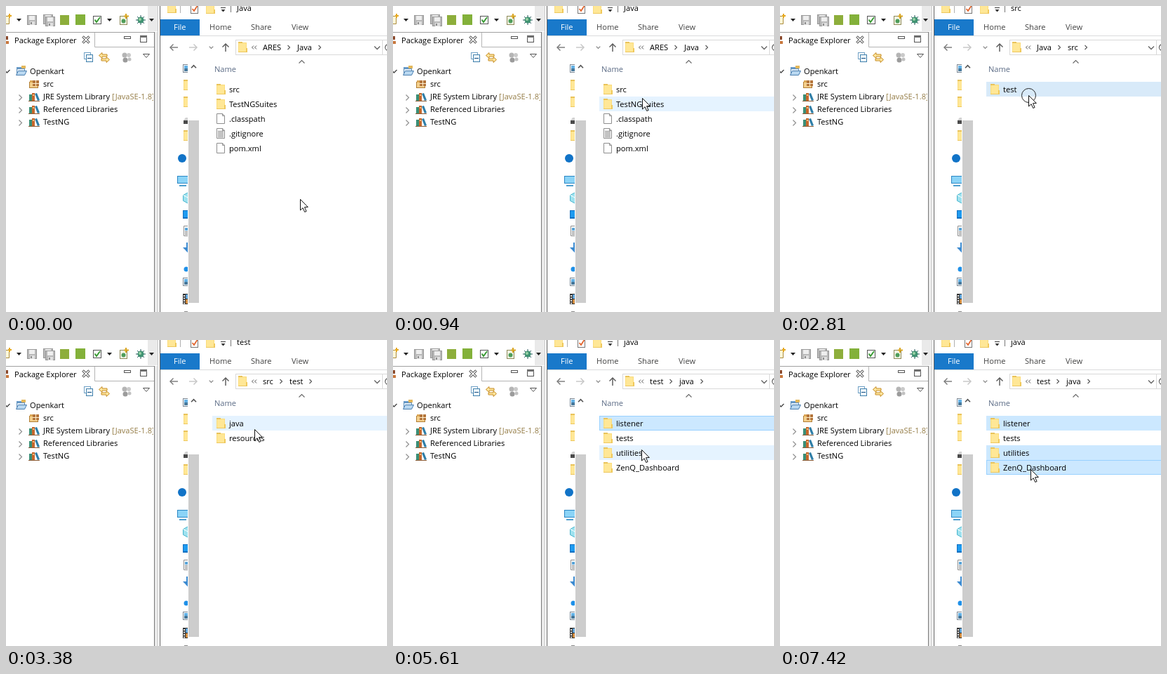
An HTML page with a canvas that plays this animation: 543 by 436 pixels, repeating every 8 s.

```html
<!DOCTYPE html>
<html lang="en">
<head>
<meta charset="utf-8">
<title>Copying folders into a project</title>
<style>
html, body { margin: 0; width: 543px; height: 436px; overflow: hidden; background: #fff; }
canvas { display: block; width: 543px; height: 436px; }
</style>
</head>
<body>
<canvas id="stage"></canvas>
<script>
(() => {
const W = 543, H = 436, LOOP = 8000;
const stage = document.getElementById('stage');
const dpr = window.devicePixelRatio || 1;
stage.width = W * dpr;
stage.height = H * dpr;
const c = stage.getContext('2d');
const FONT = '11.1px "Open Sans", "Noto Sans", sans-serif';

const HOVER = '#e5f3ff', PICK = '#cce8ff', FOCUS = '#99d1ff', SOFT = '#d8eaf9';
const ROOT = ['src/', 'TestNGSuites/', '.classpath', '.gitignore', 'pom.xml'];
const JAVA = ['listener/', 'tests/', 'utilities/', 'ZenQ_Dashboard/'];

// Each step changes part of the state: cursor, hovered row, click ring, folder...
const steps = [
  [0, { title: 'Java', path: ['ARES', 'Java'], files: ROOT, at: [419, 275], hover: -1, soft: false, picked: [], focus: -1, ring: false }],
  [400, { at: [406, 233] }],
  [520, { at: [388, 194], hover: 4 }],
  [680, { at: [376, 178], hover: 3 }],
  [820, { at: [364, 156], hover: 2 }],
  [940, { at: [355, 131], hover: 1 }],
  [1090, { at: [354, 128], hover: 0 }],
  [1210, { at: [354, 127] }],
  [1740, { ring: true, picked: [0], focus: 0 }],
  [1860, { ring: false }],
  [2010, { title: 'src', path: ['Java', 'src'], files: [], picked: [], focus: -1, hover: -1 }],
  [2130, { files: ['test/'], hover: 0 }],
  [2250, { soft: true }],
  [2810, { ring: true }],
  [2960, { ring: false }],
  [3080, { title: 'test', path: ['Java', 'src', 'test'], files: [], soft: false, hover: -1 }],
  [3230, { files: ['java/', 'resources/'], hover: 0 }],
  [3380, { path: ['src', 'test'] }],
  [3880, { ring: true, picked: [0], focus: 0 }],
  [4000, { ring: false }],
  [4150, { title: 'java', path: ['test', 'java'], files: [], picked: [], focus: -1, hover: -1 }],
  [4270, { files: JAVA }],
  [4390, { hover: 0 }],
  [4940, { ring: true, picked: [0], focus: 0 }],
  [5060, { ring: false }],
  [5190, { at: [353, 147], hover: 1 }],
  [5330, { at: [353, 152], hover: 2 }],
  [5450, { at: [353, 154] }],
  [5610, { at: [354, 156] }],
  [6040, { ring: true, picked: [0, 2], focus: 2 }],
  [6160, { ring: false }],
  [6560, { at: [354, 174], hover: 3 }],
  [6710, { at: [357, 184] }],
  [7300, { ring: true, picked: [0, 2, 3], focus: 3 }],
  [7420, { ring: false }]
];

function stateAt(t) {
  const s = {};
  for (const [time, change] of steps) if (time <= t) Object.assign(s, change);
  return s;
}

function box(x, y, w, h, fill) {
  c.fillStyle = fill;
  c.fillRect(x, y, w, h);
}
function frame(x, y, w, h, color) {
  c.strokeStyle = color;
  c.lineWidth = 1;
  c.strokeRect(x + .5, y + .5, w - 1, h - 1);
}
function trace(pts) {
  c.beginPath();
  for (let i = 0; i < pts.length; i += 2) c.lineTo(pts[i], pts[i + 1]);
}
function line(pts, color, width = 1) {
  trace(pts);
  c.strokeStyle = color;
  c.lineWidth = width;
  c.stroke();
}
function poly(pts, fill, edge) {
  trace(pts);
  c.closePath();
  c.fillStyle = fill;
  c.fill();
  if (edge) {
    c.strokeStyle = edge;
    c.lineWidth = 1;
    c.stroke();
  }
}
function dot(x, y, r, fill) {
  c.beginPath();
  c.arc(x, y, r, 0, 7);
  c.fillStyle = fill;
  c.fill();
}
function text(str, x, y, color = '#000') {
  c.fillStyle = color;
  c.fillText(str, x, y);
  return c.measureText(str).width;
}
function drop(x, y, color = '#222') {
  poly([x, y, x + 7, y, x + 3.5, y + 4], color);
}
function chevron(x, y, r, color, width = 1.1) {
  line([x - r / 2, y - r, x + r / 2, y, x - r / 2, y + r], color, width);
}
function caret(x, y, r, dir, color, width = 1.2) {
  line([x - r, y - dir * r / 2, x, y + dir * r / 2, x + r, y - dir * r / 2], color, width);
}
function folder(x, y) {
  box(x, y + 1, 12, 14, '#fbdc7c');
  box(x, y, 6, 2, '#e9c35a');
  box(x + 1, y + 2, 10, 12, '#ffe796');
  box(x + 11, y + 9, 2, 6, '#f0c95c');
  box(x, y + 14, 13, 1, '#edc75e');
}
function sheet(x, y, lined) {
  poly([x + .5, y + .5, x + 8.5, y + .5, x + 11.5, y + 3.5, x + 11.5, y + 14.5, x + .5, y + 14.5], '#fff', '#8e8e8e');
  line([x + 8.5, y + .5, x + 8.5, y + 3.5, x + 11.5, y + 3.5], '#8e8e8e');
  if (lined) for (let i = 0; i < 5; i++) box(x + 2, y + 4 + 2 * i, 8, 1, '#888');
}
function disk(x, y) {
  box(x, y, 14, 14, '#b9b9b9');
  frame(x, y, 14, 14, '#989898');
  box(x + 3, y + 1, 8, 6, '#eee');
  box(x + 4, y + 9, 7, 5, '#e0e0e0');
  box(x + 5, y + 10, 2, 3, '#8c8c8c');
}
function books(x, y) {
  box(x, y + 4, 4, 9, '#3a8f77');
  box(x + 4, y + 2, 4, 11, '#c5672b');
  box(x + 5, y + 4, 2, 2, '#f3c287');
  poly([x + 8, y + 3, x + 11, y + 2, x + 15, y + 12, x + 12, y + 13], '#2f7fa8');
  box(x - 1, y + 13, 16, 1, '#8b5a33');
}

function ideToolbar() {
  box(202, 0, 14, 36, '#eaeaea');
  box(0, 14, 5, 12, '#fff8d8');
  line([0, 14.5, 4.5, 14.5, 4.5, 25.5, 0, 25.5], '#a98a3c');
  box(3, 13, 5, 2, '#e6a91f');
  box(4, 11, 2, 6, '#e6a91f');
  drop(15, 18);
  disk(30, 13);
  disk(53, 12);
  disk(56, 15);
  box(77, 13, 13, 14, '#8dae3b');
  box(99, 12, 14, 15, '#83b13a');
  box(124, 14, 12, 12, '#fff');
  frame(124, 14, 12, 12, '#555');
  line([126.5, 19.5, 129, 23, 134, 16], '#3a9b35', 2);
  drop(144, 18);
  box(162, 14, 11, 13, '#f1f4e4');
  frame(162, 14, 11, 13, '#8f8a5a');
  dot(167.5, 21.5, 3, '#4f9d5a');
  box(170, 11, 2, 7, '#d9a520');
  box(168, 13.5, 7, 2, '#d9a520');
  for (let i = 0; i < 4; i++) {
    const a = Math.PI * i / 4;
    const dx = 7 * Math.cos(a), dy = 7 * Math.sin(a);
    line([192 - dx, 20 - dy, 192 + dx, 20 + dy], '#25545a');
  }
  dot(192, 20, 4.5, '#3f9272');
  dot(191, 19, 2, '#9ad2a6');
  drop(204, 18);
}

function idePanel() {
  box(0, 37, 212, 1, '#a0a0a0');
  line([126.5, 38, 126.5, 58.5, 211, 58.5], '#b4b4b4');
  box(0, 43, 3, 5, '#8b4a2d');
  box(0, 50, 4, 4, '#c8783e');
  text('Package Explorer', 12, 53);
  line([109.5, 43.5, 118.5, 52.5], '#555', 3.6);
  line([118.5, 43.5, 109.5, 52.5], '#555', 3.6);
  line([110, 44, 118, 52], '#fff', 1.6);
  line([118, 44, 110, 52], '#fff', 1.6);
  frame(168, 43, 10, 4, '#555');
  frame(191, 42, 10, 10, '#555');
  box(191, 43, 10, 2, '#777');

  frame(111, 66, 10, 10, '#6d9fc4');
  box(114, 69, 10, 11, '#eef7fd');
  frame(114, 69, 10, 11, '#3f7fab');
  box(116, 74, 6, 1, '#164f83');
  poly([132.5, 70.5, 137, 66.5, 137, 69, 144, 69, 144, 72, 137, 72, 137, 74.5], '#ffe7a0', '#c58a21');
  poly([147.5, 76.5, 143, 72.5, 143, 75, 136, 75, 136, 78, 143, 78, 143, 80.5], '#ffe7a0', '#c58a21');
  dot(169, 70, 3.5, '#b5b5b5');
  dot(175, 70, 3, '#cacaca');
  dot(170, 77, 3.5, '#9b9b9b');
  dot(176, 76, 2.5, '#c1c1c1');
  poly([195.5, 68.5, 204.5, 68.5, 200, 73.5], '#fff', '#555');

  caret(1.5, 93, 4, 1, '#444', 1.3);
  box(15, 87, 7, 3, '#6a9cc9');
  box(15, 89, 12, 9, '#e4f0fa');
  frame(15, 89, 12, 9, '#5f8fbc');
  poly([17.5, 92.5, 29.5, 92.5, 26.5, 98.5, 14.5, 98.5], '#b8d7f0', '#4b7fb0');
  box(22, 85, 6, 4, '#e3b75a');
  text('Openkart', 34, 97);
  box(33, 108, 13, 9, '#f4d08c');
  frame(33, 108, 13, 9, '#b07d35');
  box(34, 106, 6, 3, '#dba756');
  box(38, 106, 9, 8, '#b3743a');
  box(42, 106, 1, 8, '#fff0cf');
  box(38, 110, 9, 1, '#fff0cf');
  text('src', 53, 115);
  ['JRE System Library', 'Referenced Libraries', 'TestNG'].forEach((name, i) => {
    const y = 133 + 18 * i;
    chevron(20.5, y - 2.5, 4, '#8f8f8f', 1.2);
    books(33, y - 11);
    const w = text(name, 53, y);
    if (i === 0) {
      c.save();
      c.beginPath();
      c.rect(0, 100, 210, 60);
      c.clip();
      text(' [JavaSE-1.8]', 53 + w, y, '#957d47');
      c.restore();
    }
  });
  box(211, 37, 1, 399, '#777');
  box(212, 37, 4, 399, '#eaeaea');
  box(216, 0, 1, H, '#c6c6c6');
}

function navPane() {
  c.save();
  c.beginPath();
  c.rect(240, 78, 19, 358);
  c.clip();
  const picture = y => {
    box(252, y, 12, 12, '#fff');
    frame(252, y, 12, 12, '#7a8794');
    box(254, y + 2, 8, 4, '#63b1e5');
    box(254, y + 6, 8, 4, '#48789a');
  };
  picture(83);
  folder(253, 105);
  folder(253, 129);
  poly([253, 163, 256, 159, 262, 159, 262, 163], '#d3d3d3');
  box(253, 163, 10, 5, '#4b4b4b');
  folder(253, 177);
  dot(251, 217, 6, '#1173c7');
  box(244, 242, 17, 11, '#2c87c4');
  box(245, 243, 15, 9, '#8bd4f7');
  box(247, 255, 10, 2, '#4f9fcf');
  poly([252.5, 269.5, 259, 266, 266, 269.5, 266, 277, 259, 281, 252.5, 277.5], '#9fe2ef', '#47b5cd');
  line([252.5, 269.5, 259, 273], '#fff');
  box(252, 291, 14, 12, '#1370c0');
  box(253, 292, 13, 9, '#1e9bf0');
  sheet(253, 313, true);
  box(255, 316, 4, 4, '#5aa5d8');
  box(257, 337, 5, 9, '#3c8ad0');
  poly([252, 344, 267, 344, 259.5, 352], '#3c8ad0');
  dot(257, 375, 3.5, '#1e90e8');
  box(259, 366, 2, 9, '#1e90e8');
  picture(387);
  box(252, 410, 14, 15, '#333');
  for (let i = 0; i < 4; i++) box(253, 412 + 3.5 * i, 2, 2, '#eee');
  box(256, 411, 8, 6, '#5fa3d8');
  box(256, 418, 8, 6, '#d08a3c');
  box(254, 435, 8, 1, '#888');
  c.restore();
  box(260, 163, 15, 260, '#cdcdcd');
  caret(267.5, 86.5, 3.5, -1, '#555', 1.6);
}

function explorerChrome() {
  box(219, 0, 1, H, '#5e5e5e');
  box(220, 0, W - 220, H, '#fff');
  folder(230, -5);
  box(248, 0, 1, 10, '#b0b0b0');
  box(263, -1, 11, 12, '#fff');
  frame(263, -1, 11, 12, '#777');
  line([265.5, 4, 268, 7, 272.5, 0], '#e2642d', 1.8);
  folder(285, -4);
  box(306, 2, 7, 1, '#333');
  poly([306.5, 5, 312.5, 5, 309.5, 8.5], '#333');
  box(320, 0, 1, 9, '#777');
  box(220, 19, 56, 23, '#1979ca');
  text('File', 239, 34, '#fff');
  [['Home', 290], ['Share', 349], ['View', 407]].forEach(([name, x]) => text(name, x, 34, '#444'));
  box(220, 42, W - 220, 1, '#dadbdc');

  line([245, 59, 234, 59], '#777', 1.4);
  line([238.5, 54.5, 234, 59, 238.5, 63.5], '#777', 1.4);
  line([261, 59, 272, 59], '#c4c4c4', 1.4);
  line([267.5, 54.5, 272, 59, 267.5, 63.5], '#c4c4c4', 1.4);
  caret(292.5, 59, 2.8, 1, '#888', 1.3);
  line([313, 65, 313, 54], '#555', 1.4);
  line([308.5, 58.5, 313, 54, 317.5, 58.5], '#555', 1.4);
  frame(327, 48, 210, 22, '#d9d9d9');
  box(537, 48, 6, 1, '#d9d9d9');
  box(537, 69, 6, 1, '#d9d9d9');
  folder(331, 51);
  for (const x of [351.5, 355.5]) line([x + 1.5, 56.5, x - 1, 59, x + 1.5, 61.5], '#555');
  caret(529, 59.5, 4, 1, '#666', 1.4);
  c.beginPath();
  c.arc(545, 59, 4.5, 2, 4.6);
  c.strokeStyle = '#666';
  c.lineWidth = 1.3;
  c.stroke();
  caret(421.5, 79.5, 4, -1, '#666', 1.1);
  text('Name', 297, 94, '#5b6b85');
}

function addressBar(s) {
  text(s.title, 329, 7);
  let x = 366;
  s.path.forEach((name, i) => {
    x += Math.round(text(name, x, 63));
    if (i < 2) chevron(x + 11, 59, 3, '#555');
    x += 23;
  });
}

function fileList(s) {
  s.files.forEach((name, i) => {
    const y = 108 + 21 * i;
    const picked = s.picked.includes(i);
    if (picked || i === s.hover) box(294, y, 249, 21, picked ? PICK : s.soft ? SOFT : HOVER);
    if (i === s.focus) frame(294, y, 250, 21, FOCUS);
    if (name.endsWith('/')) folder(300, y + 3);
    else sheet(300, y + 3, name === '.gitignore');
    text(name.replace('/', ''), 318, y + 15);
  });
}

function pointer(s) {
  const [x, y] = s.at;
  if (s.ring) {
    c.beginPath();
    c.arc(x + .5, y + .5, 10, 0, 7);
    c.strokeStyle = '#222';
    c.lineWidth = 1;
    c.stroke();
  }
  c.save();
  c.translate(x + .5, y + .5);
  poly([0, 0, 0, 15.5, 3.6, 12.2, 6.2, 18, 8.6, 17, 6, 11.2, 10.8, 11], '#fff', '#111');
  c.restore();
}

function draw(t) {
  const s = stateAt(t);
  c.setTransform(dpr, 0, 0, dpr, 0, 0);
  c.font = FONT;
  c.textBaseline = 'alphabetic';
  box(0, 0, W, H, '#fff');
  ideToolbar();
  idePanel();
  explorerChrome();
  navPane();
  addressBar(s);
  fileList(s);
  pointer(s);
}

const start = performance.now();
function tick() {
  draw((performance.now() - start) % LOOP);
  requestAnimationFrame(tick);
}
tick();
})();
</script>
</body>
</html>
```
